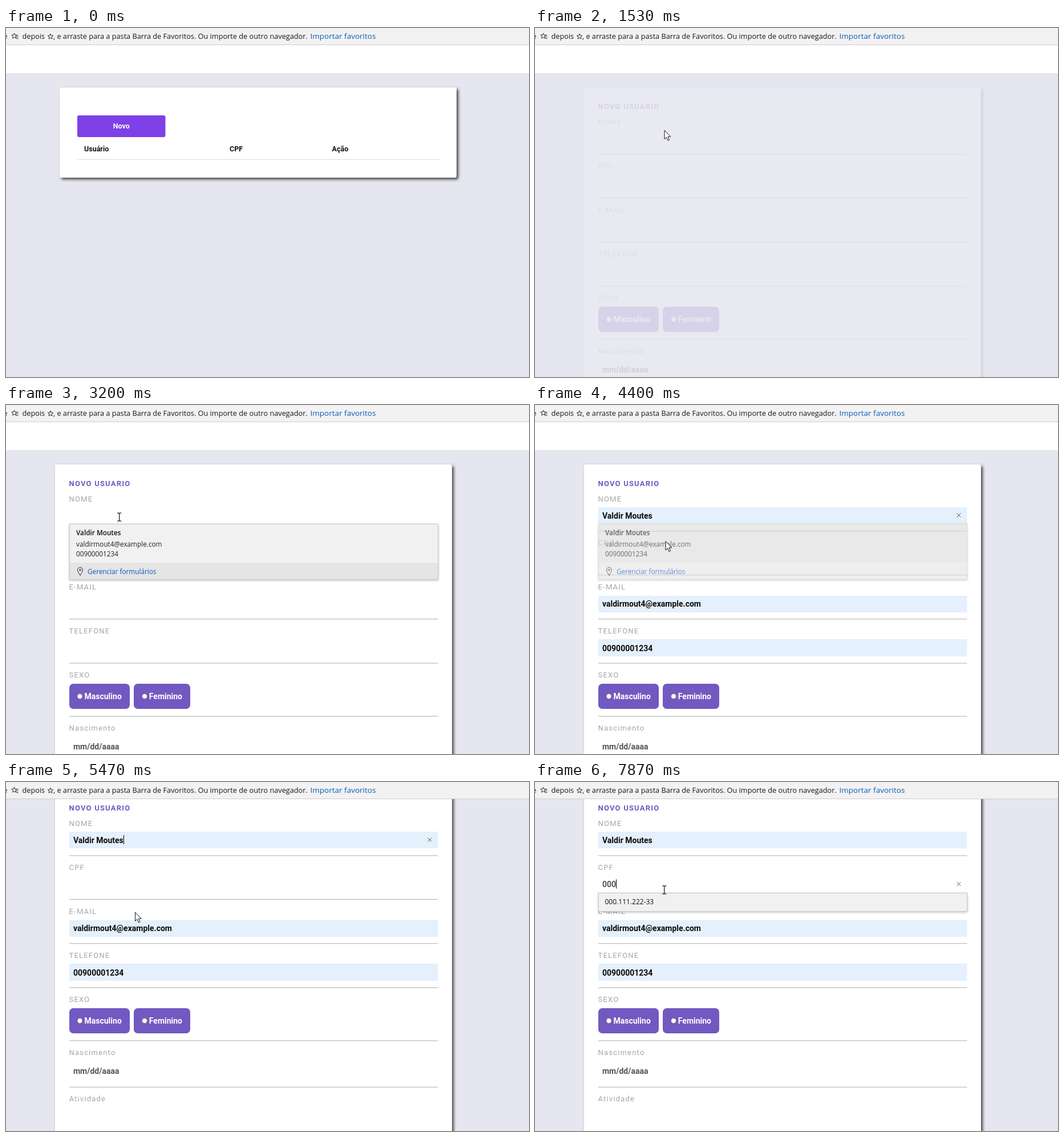
These frames come from a looping animation (917x611 px, 8 s). An HTML page:

```html
<!DOCTYPE html>
<html lang="pt-BR">
<head>
<meta charset="utf-8">
<title>Novo usuario</title>
<style>
  html, body { margin: 0; width: 100%; height: 100%; overflow: hidden; background: #e6e6f0; }
  #stage { position: relative; width: 917px; height: 611px; overflow: hidden; }
  #stage div, #stage svg { position: absolute; }
  .layer { left: 0; top: 0; width: 917px; height: 611px; }
  svg { left: 0; top: 0; width: 917px; height: 900px; overflow: visible; }
  .top { left: 0; top: 30px; width: 917px; height: 49px; background: #fff; }
  .card { width: 696px; background: #fff; border-radius: 3px; box-shadow: 3px 3px 5px rgba(0, 0, 0, .7); }
  #list .card { left: 94px; top: 104px; height: 158px; }
  #form .card { left: 86px; top: 104px; height: 720px; }
  .pop { left: 111px; width: 645px; background: #f1f1f1; border: 1px solid #cbcbcb; box-shadow: 0 1px 4px rgba(0, 0, 0, .28); }
  #people { top: 208px; height: 96px; }
  #codes { top: 194px; height: 31px; }
  #item { left: 0; top: 0; width: 645px; height: 67px; }
  .foot { left: 0; top: 67px; width: 645px; height: 29px; background: #e5e5e5; }
  .bar { left: 0; top: 0; width: 917px; height: 29px; background: #f2f2f2; border-bottom: 1px solid #cdcdcd; }
  text { font-family: Roboto, sans-serif; }
  .ui { font: 11.75px "Open Sans", sans-serif; fill: #222; }
  .tip { font: 12.72px "Open Sans", sans-serif; fill: #1a1a1a; }
  .link { fill: #0a5cb8; }
  .head { font-size: 12.5px; font-weight: 700; fill: #111; }
  .label { font-size: 13px; letter-spacing: 1.2px; fill: #a6a6a6; }
  .title { font-weight: 700; fill: #7159c1; }
  .value { font-size: 14px; font-weight: 700; fill: #0b0b0b; }
  .soft { fill: #555; }
  .light { fill: #fff; }
  .hint { font: 13px "Open Sans", sans-serif; fill: #111; }
  .rule { fill: #b3b3b3; }
  .fill { fill: #e4f0fb; }
  .cross { fill: none; stroke: #5c5c5c; stroke-width: 1; }
  .line { fill: none; stroke: #2b2b2b; stroke-width: 1; stroke-linejoin: round; }
</style>
</head>
<body>
<div id="stage">
  <div id="list" class="layer">
    <div class="top"></div>
    <div class="card"></div>
    <svg>
      <rect id="add" x="125" y="153" width="154.5" height="38" rx="3"/>
      <text class="head light" x="202.3" y="176.3" text-anchor="middle">Novo</text>
      <text class="head" x="137" y="216">Usuário</text>
      <text class="head" x="392" y="216">CPF</text>
      <text class="head" x="571.5" y="216">Ação</text>
      <rect x="125" y="230" width="634.5" height="1" fill="#dadada"/>
    </svg>
  </div>

  <div id="form" class="layer">
    <div class="top"></div>
    <div id="sheet" class="layer">
      <div class="card"></div>
      <svg>
        <text class="label title" x="110.5" y="141.5">NOVO USUARIO</text>
        <g id="rows"></g>
        <g id="filled">
          <rect class="fill" x="111" y="179" width="646.5" height="29"/>
          <rect class="fill" x="111" y="334" width="646.5" height="29"/>
          <rect class="fill" x="111" y="410" width="646.5" height="30"/>
        </g>
        <g id="hints">
          <text class="hint" x="118" y="198">Valdir Moutes</text>
          <text class="hint" x="118" y="352.5">valdirmout4@example.com</text>
          <text class="hint" x="118" y="430">00900001234</text>
        </g>
        <g id="values">
          <text class="value" id="name" x="118" y="198.5">Valdir Moutes</text>
          <text class="value" x="118" y="353">valdirmout4@example.com</text>
          <text class="value" x="118" y="430.5">00900001234</text>
        </g>
        <text class="value soft" id="code" x="118" y="276"></text>
        <path class="cross" id="clearName" d="M739.5 189.5l7 7m0-7l-7 7"/>
        <path class="cross" id="clearCode" d="M739.5 267l7 7m0-7l-7 7"/>
        <rect x="111" y="488" width="106" height="44" rx="7" fill="#7159c1"/>
        <rect x="224" y="488" width="99" height="44" rx="7" fill="#7159c1"/>
        <g fill="#fff" stroke="#777" stroke-width="1">
          <circle cx="129.5" cy="510" r="4.5"/>
          <circle cx="243" cy="510" r="4.5"/>
        </g>
        <text class="value light" x="137.5" y="514.5">Masculino</text>
        <text class="value light" x="250.8" y="514.5">Feminino</text>
        <text class="value soft" x="118" y="602.5">mm/dd/aaaa</text>
        <rect id="caret" width="1" height="16"/>
      </svg>
    </div>
  </div>

  <div id="people" class="pop">
    <div id="item"></div>
    <div class="foot"></div>
    <svg>
      <text class="ui" x="11" y="19" font-weight="600" style="font-weight:600;fill:#111">Valdir Moutes</text>
      <text class="ui" x="11" y="38.5">valdirmout4@example.com</text>
      <text class="ui" x="11" y="56">00900001234</text>
      <path class="line" d="M18 89.5C16 85.500 13.500 82.500 13.500 79.700a4.500 4.500 0 0 1 9 0C22.500 82.500 20 85.500 18 89.500z"/>
      <circle class="line" cx="18" cy="79.700" r="1.500"/>
      <text class="ui link" x="31" y="87">Gerenciar formulários</text>
    </svg>
  </div>

  <div id="codes" class="pop">
    <svg><text class="ui" x="10.500" y="19" style="font-size:12px;font-weight:500;fill:#111">000.111.222-33</text></svg>
  </div>

  <div class="bar">
    <svg>
      <text class="tip" x="2.500" y="19" text-anchor="end">e</text>
      <path class="line" id="starA"/>
      <path class="line" d="M16.500 12.500h5M17.500 15.500h4M18 18.500h3.500"/>
      <text class="tip" x="28.500" y="19">depois</text>
      <path class="line" id="starB"/>
      <text class="tip" x="83" y="19">, e arraste para a pasta Barra de Favoritos. Ou importe de outro navegador.</text>
      <text class="tip link" x="533.500" y="19" style="font-size:13.500px">Importar favoritos</text>
    </svg>
  </div>

  <svg>
    <path id="arrow" d="M.5 .5V16L4 12.700 6.500 18.500 9 17.400 6.500 11.700H11.200z" fill="#fff" stroke="#111" stroke-width="1"/>
    <path id="beam" d="M-3.500 -7h2.500l1 1 1 -1h2.500M0 -6V6M-3.500 7h2.500l1 -1 1 1h2.500" fill="none" stroke="#111" stroke-width="1.200"/>
  </svg>
</div>

<script>
const LOOP = 8000;
const $ = id => document.getElementById(id);
const show = (id, on) => { $(id).style.visibility = on ? 'visible' : 'hidden'; };

const star = (cx, cy, r) => 'M' + Array.from({ length: 10 }, (_, i) => {
  const a = i * Math.PI / 5, d = i % 2 ? r * 0.45 : r;
  return (cx + d * Math.sin(a)).toFixed(2) + ' ' + (cy - d * Math.cos(a)).toFixed(2);
}).join('L') + 'z';
$('starA').setAttribute('d', star(14.5, 14, 5));
$('starB').setAttribute('d', star(78, 15, 5));

// label, baseline, rule below
$('rows').innerHTML = [
  ['NOME', 168.5, 220.4], ['CPF', 245.7, 297], ['E-MAIL', 322.5, 374.2], ['TELEFONE', 399.7, 451.5],
  ['SEXO', 477, 544.4], ['Nascimento', 570, 625.6], ['Atividade', 651, 760]
].map(([s, y, line]) =>
  `<text class="label" x="110.5" y="${y}">${s}</text>` +
  `<rect class="rule" x="111" y="${line}" width="646.5" height="1.1"/>`).join('');

// eased value of a [time, ...values] track
function at(t, keys) {
  if (t <= keys[0][0]) return keys[0].slice(1);
  for (let i = 1; i < keys.length; i++) {
    const [a, b] = [keys[i - 1], keys[i]];
    if (t < b[0]) {
      const u = (t - a[0]) / (b[0] - a[0]), e = u * u * (3 - 2 * u);
      return a.slice(1).map((v, k) => v + (b[k + 1] - v) * e);
    }
  }
  return keys[keys.length - 1].slice(1);
}
const ramp = (t, from, to) => Math.min(1, Math.max(0, (t - from) / (to - from)));

const POINTER = [
  [270, 639, 172], [1070, 237, 167], [1270, 237, 167], [1870, 196.5, 211.5], [2000, 197, 215],
  [2200, 198.7, 196.2], [3800, 198.7, 196.2], [4200, 228.5, 238], [5070, 228.5, 238],
  [5470, 226, 227.5], [5600, 226, 217], [6000, 226.7, 188.8]
];
const SCROLL = [[5070, 0], [5430, 92]];
const FADE = [[1330, 0], [1930, 1]];
const BLINK = [[2400, 3000], [3470, 3930], [4400, 4730], [5270, 5800], [6070, 6600], [7200, LOOP]];
const TYPED = [7470, 7670, 7870];

function draw(t) {
  const onForm = t >= 1400, picked = t >= 4400, inCode = t >= 6070;
  show('list', !onForm);
  $('form').style.display = onForm ? 'block' : 'none';
  $('sheet').style.opacity = at(t, FADE)[0];
  $('form').style.transform = `translateY(${-at(t, SCROLL)[0]}px)`;

  const h = ramp(t, 730, 1000);
  const mix = (a, b) => Math.round(a + (b - a) * h);
  $('add').style.fill = `rgb(${mix(126, 106)},${mix(64, 47)},${mix(231, 200)})`;

  const hover = t >= 3930;
  $('people').style.opacity = t < 4400 ? ramp(t, 2530, 2930) : 1 - ramp(t, 4330, 4530);
  $('item').style.background = hover ? '#dedede' : '#f1f1f1';
  $('codes').style.opacity = ramp(t, 6530, 6930);

  $('filled').style.display = hover ? '' : 'none';
  $('hints').style.display = hover && !picked ? '' : 'none';
  $('values').style.display = picked ? '' : 'none';
  $('clearName').style.display = picked && !inCode ? '' : 'none';

  const count = TYPED.filter(k => t >= k).length;
  $('code').textContent = '0'.repeat(count);
  $('clearCode').style.display = count ? '' : 'none';

  const blink = BLINK.reduce((m, [a, b]) =>
    Math.max(m, ramp(t, a, a + 200) * (b < LOOP ? 1 - ramp(t, b, b + 200) : 1)), 0);
  const caret = $('caret');
  caret.style.opacity = blink;
  caret.setAttribute('x', inCode ? 118 + Math.round(count * 8.05) : picked ? 118 + nameWidth : 118);
  caret.setAttribute('y', inCode ? 262.5 : 185);

  const [x, y] = at(t, POINTER);
  const beam = (t >= 2130 && t < 3930) || t >= 5800;
  show('arrow', t >= 270 && !beam);
  show('beam', beam);
  for (const id of ['arrow', 'beam']) $(id).setAttribute('transform', `translate(${x} ${y})`);
}

const nameWidth = Math.round($('name').getComputedTextLength());

// the screen updates 15 times a second
function tick() {
  const step = Math.floor((performance.now() % LOOP + 1) * 15 / 1000);
  draw(Math.round(step * 20 / 3) * 10);
  requestAnimationFrame(tick);
}
tick();
</script>
</body>
</html>
```
